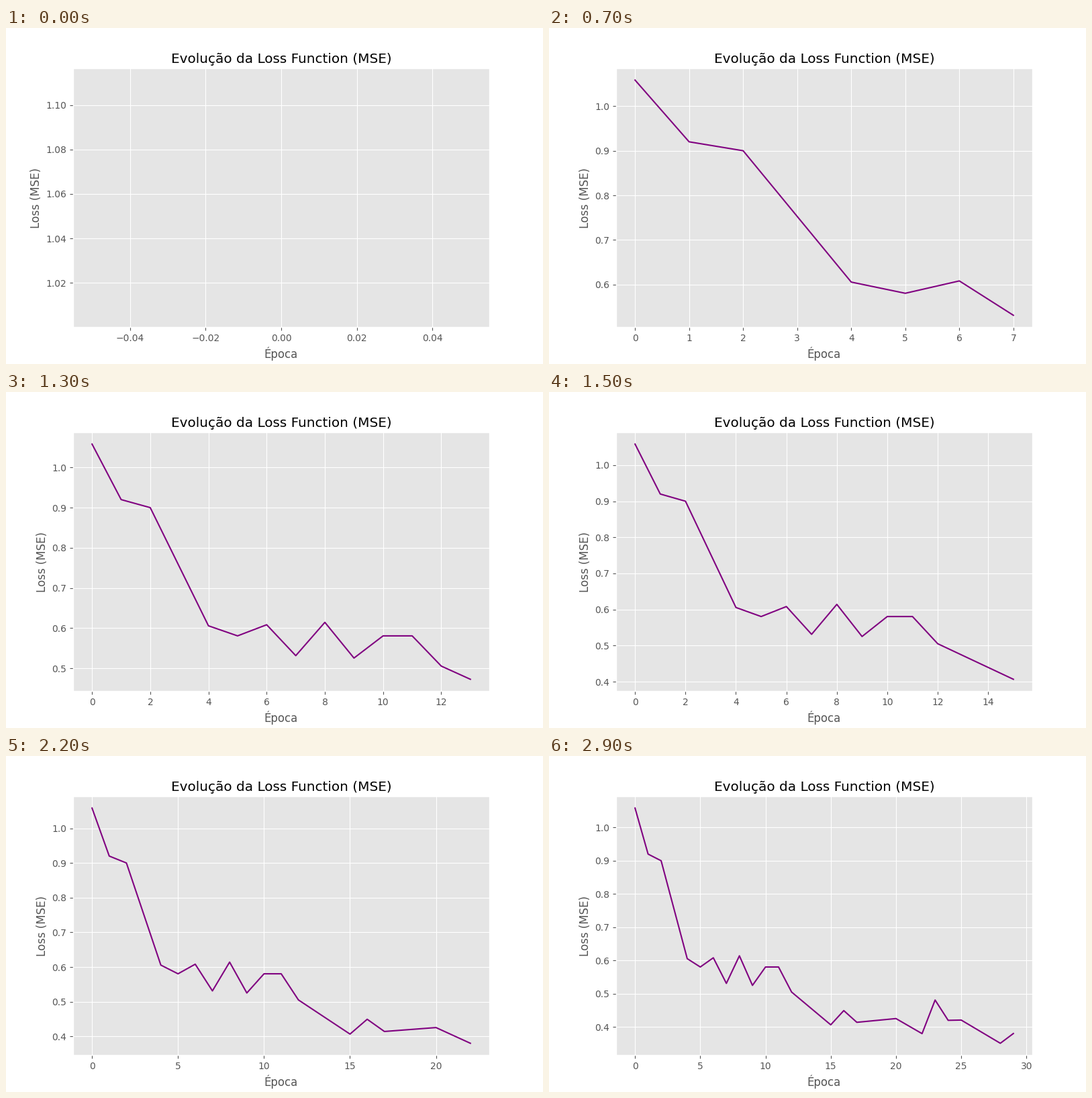
Write a matplotlib script that moves like this. It is 800 px wide and 500 px high and loops after 3 s.

```python
import matplotlib.pyplot as plt
import numpy as np
from matplotlib.animation import FuncAnimation

plt.style.use("ggplot")

EPOCHS = 30

# Turning points (epoch, loss) of the underlying descent
TREND = [(0, 1.0583), (1, 0.92), (2, 0.90), (4, 0.6057), (5, 0.5806),
         (11, 0.5806), (12, 0.5053), (15, 0.4068), (20, 0.4256), (22, 0.3803),
         (24, 0.4203), (25, 0.4211), (28, 0.3513), (29, 0.3807)]


def loss_curve():
    """Piecewise descent with a growing zigzag on the plateau and two late spikes."""
    t = np.arange(EPOCHS)
    loss = np.interp(t, *zip(*TREND))
    zigzag = (-1.0) ** t * (0.019 + 0.003 * t) - 0.0093
    loss += np.where((t >= 6) & (t <= 9), zigzag, 0)
    loss[16] += 0.039
    loss[23] += 0.081
    return loss


losses = loss_curve()
fig, ax = plt.subplots(figsize=(8, 5), dpi=100)


def draw(epoch):
    """Redraw the curve up to the given epoch with freshly fitted axes."""
    ax.clear()
    ax.plot(losses[:epoch + 1], color="purple")
    ax.set_title("Evolução da Loss Function (MSE)")
    ax.set_xlabel("Época")
    ax.set_ylabel("Loss (MSE)")


anim = FuncAnimation(fig, draw, frames=EPOCHS, init_func=lambda: draw(0),
                     interval=100, repeat=True, repeat_delay=0)

plt.show()
```
